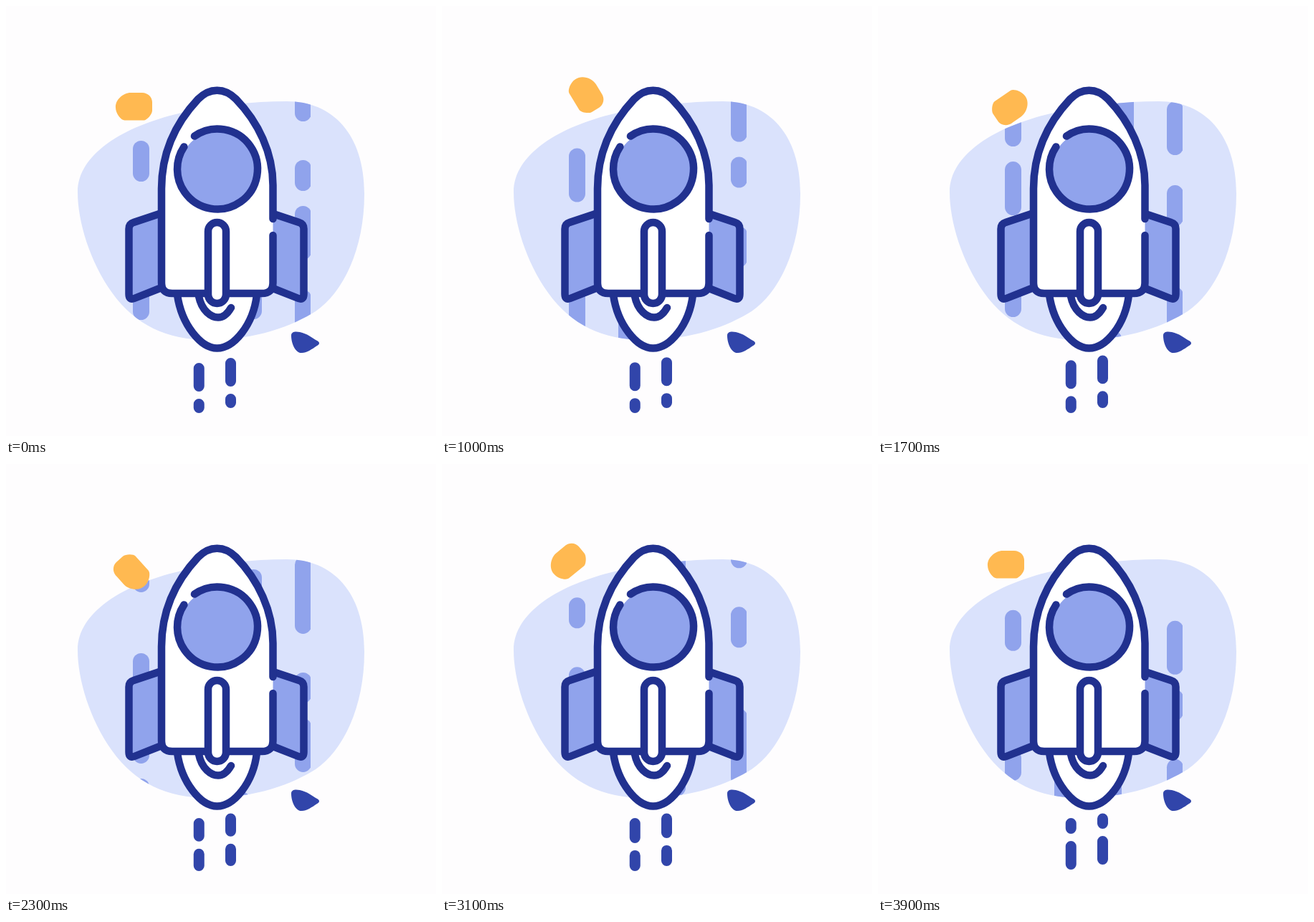
An HTML page with a canvas for the animation above (4 s loop, 600 by 600 pixels).

```html
<!DOCTYPE html>
<html lang="en">
<head>
<meta charset="utf-8">
<title>Rocket</title>
<style>
  html, body { margin: 0; width: 100%; height: 100%; overflow: hidden; background: #fefdfe; }
  canvas { display: block; width: 600px; height: 600px; }
</style>
</head>
<body>
<canvas id="stage" width="600" height="600"></canvas>
<script>
const ctx = document.getElementById('stage').getContext('2d');
const LOOP = 4000, STEP = 100, TURN = 3900;
const INK = '#21318f', BLUE = '#3145aa', SOFT = '#90a3ec', PALE = '#dae2fc',
      WHITE = '#ffffff', ORANGE = '#ffb951', PAPER = '#fefdfe';

const blob = new Path2D('M100 260 C100 206 165 168 241 150 C290 139 345 133 392 133 C455 133 500 178 500 262 C500 340 470 400 432 426 C400 446 350 466 282 466 C225 466 180 445 148 400 C117 357 100 300 100 260Z');
const hull = new Path2D('M217 386 V255 C217 205 235 165 268 130 C284 113.5 305 113.5 321 130 C352 162 372.5 205 372.5 250 V386 Q372.5 401 357 401 H232 Q217 401 217 386Z');
const hullLine = new Path2D('M372.5 297 V250 C372.5 205 352 162 321 130 C305 113.5 284 113.5 268 130 C235 165 217 205 217 255 V386 Q217 401 232 401 H357 Q372.5 401 372.5 386 V320');
const fin = new Path2D('M217 289 L178 302 Q171.5 304 171.5 311 V402 Q171.5 411 179 408 L217 393');
const flame = new Path2D('M239 403 C245 445 272 477.5 294.5 477.5 C318 477.5 345 445 350 403');
const flameCore = new Path2D('M269 405 C273 425 286 434.5 296 434.5 C304 434.5 310 428 314 421');
const shard = new Path2D('M398 460 C398 454 404 454 410 455 C420 457 427 463 434 467 C438 469 438 472 434 474 C427 479 419 484 413 484 C404 485 398 471 398 460Z');
const pebble = new Path2D('M-25.5 2 C-26.5 -9 -15 -19 -4.5 -19 H9.5 C19 -20 25.5 -13 25.5 -6 V6 C25.5 11 18 19.5 14 19.5 H-13 C-18 19.5 -25.5 10 -25.5 2Z');

// Streak lanes: [start, length] along a strip that slides down.
const STRIP = 820;
const leftStreaks = [[0, 108], [193, 57], [304, 43], [368, 75], [528, 57], [627, 75], [723, 43]];
const rightStreaks = leftStreaks.map(([s, n]) => [(STRIP + 108 - s - n) % STRIP, n]);
const innerLanes = [
  { x: 334, streaks: [[186, 59], [385, 57], [-550, 60], [-744, 43]] },
  { x: 317, streaks: [[-216, 66], [-434, 54], [-700, 60], [-875, 45], [-980, 40]] },
  { x: 246, streaks: [[30, 70], [-890, 60]] }
];

const pebbleKeys = [[0, 178.5, 140], [1000, 201, 123], [2200, 175.5, 152.5], [3100, 175, 136], [TURN, 178.5, 140]];

const smooth = p => p * p * (3 - 2 * p);

function paint(path, fill, line) {
  if (fill) { ctx.fillStyle = fill; ctx.fill(path); }
  if (line) { ctx.strokeStyle = line; ctx.stroke(path); }
}

function streak(x, y, width, length) {
  ctx.beginPath();
  ctx.roundRect(x, y, width, length, 11.5);
  ctx.fill();
}

function loopLane(x, width, streaks, offset) {
  for (const [start, length] of streaks) {
    const y = (((start + offset) % STRIP) + STRIP) % STRIP;
    streak(x, y, width, length);
    streak(x, y - STRIP, width, length);
  }
}

function drawStreaks(t) {
  const turn = 2178;
  const slide = -5 + 0.3965 * Math.min(t, turn) + 0.2655 * Math.max(0, t - turn);
  ctx.save();
  ctx.clip(blob);
  ctx.beginPath();
  ctx.rect(0, 0, 425, 600);
  ctx.clip();
  ctx.fillStyle = SOFT;
  loopLane(177, 23, leftStreaks, slide);
  loopLane(403, 23, rightStreaks, slide + 58);
  for (const { x, streaks } of innerLanes) {
    for (const [start, length] of streaks) streak(x, start + slide, 23, length);
  }
  ctx.restore();
}

function drawRocket() {
  ctx.lineWidth = 10.5;
  ctx.lineCap = ctx.lineJoin = 'round';
  paint(flame, WHITE, INK);
  paint(flameCore, null, INK);
  paint(fin, SOFT, INK);
  ctx.save();
  ctx.translate(587, 0);
  ctx.scale(-1, 1);
  paint(fin, SOFT, INK);
  ctx.restore();
  paint(hull, WHITE);
  paint(hullLine, null, INK);

  ctx.beginPath();
  ctx.arc(295, 227.5, 52.5, 0, 7);
  ctx.fillStyle = SOFT;
  ctx.fill();
  ctx.beginPath();
  ctx.arc(295, 227.5, 56, -2.18, 3.73);
  ctx.stroke();

  ctx.beginPath();
  ctx.roundRect(282, 302, 25, 113, 12.5);
  ctx.fillStyle = WHITE;
  ctx.fill();
  ctx.stroke();
}

function drawExhaust(t) {
  const p = t / TURN;
  const travel = 228 * (0.56 * p + 0.44 * smooth(Math.min(p, 1)));
  ctx.save();
  ctx.strokeStyle = BLUE;
  ctx.lineWidth = 15;
  ctx.lineCap = 'round';
  ctx.setLineDash([25, 25]);
  for (const [x, top, bottom, phase] of [[269.25, 501.5, 560.5, 4], [313.5, 495, 553.5, 3.5]]) {
    ctx.lineDashOffset = -(phase + travel);
    ctx.beginPath();
    ctx.moveTo(x, top);
    ctx.lineTo(x, bottom);
    ctx.stroke();
  }
  ctx.restore();
}

function drawPebble(t) {
  const i = Math.max(1, pebbleKeys.findIndex(key => key[0] >= t));
  const [t0, x0, y0] = pebbleKeys[i - 1];
  const [t1, x1, y1] = pebbleKeys[i];
  const k = smooth((t - t0) / (t1 - t0));
  ctx.save();
  ctx.translate(x0 + (x1 - x0) * k, y0 + (y1 - y0) * k);
  ctx.rotate(2 * Math.PI * smooth(t / TURN));
  paint(pebble, ORANGE);
  ctx.restore();
}

function draw(t) {
  ctx.fillStyle = PAPER;
  ctx.fillRect(0, 0, 600, 600);
  paint(blob, PALE);
  drawStreaks(t);
  drawRocket();
  drawExhaust(t);
  paint(shard, BLUE);
  drawPebble(t);
}

const begin = performance.now();
function tick() {
  const t = (performance.now() - begin) % LOOP;
  draw(Math.floor(t / STEP) * STEP);
  requestAnimationFrame(tick);
}
tick();
</script>
</body>
</html>
```
